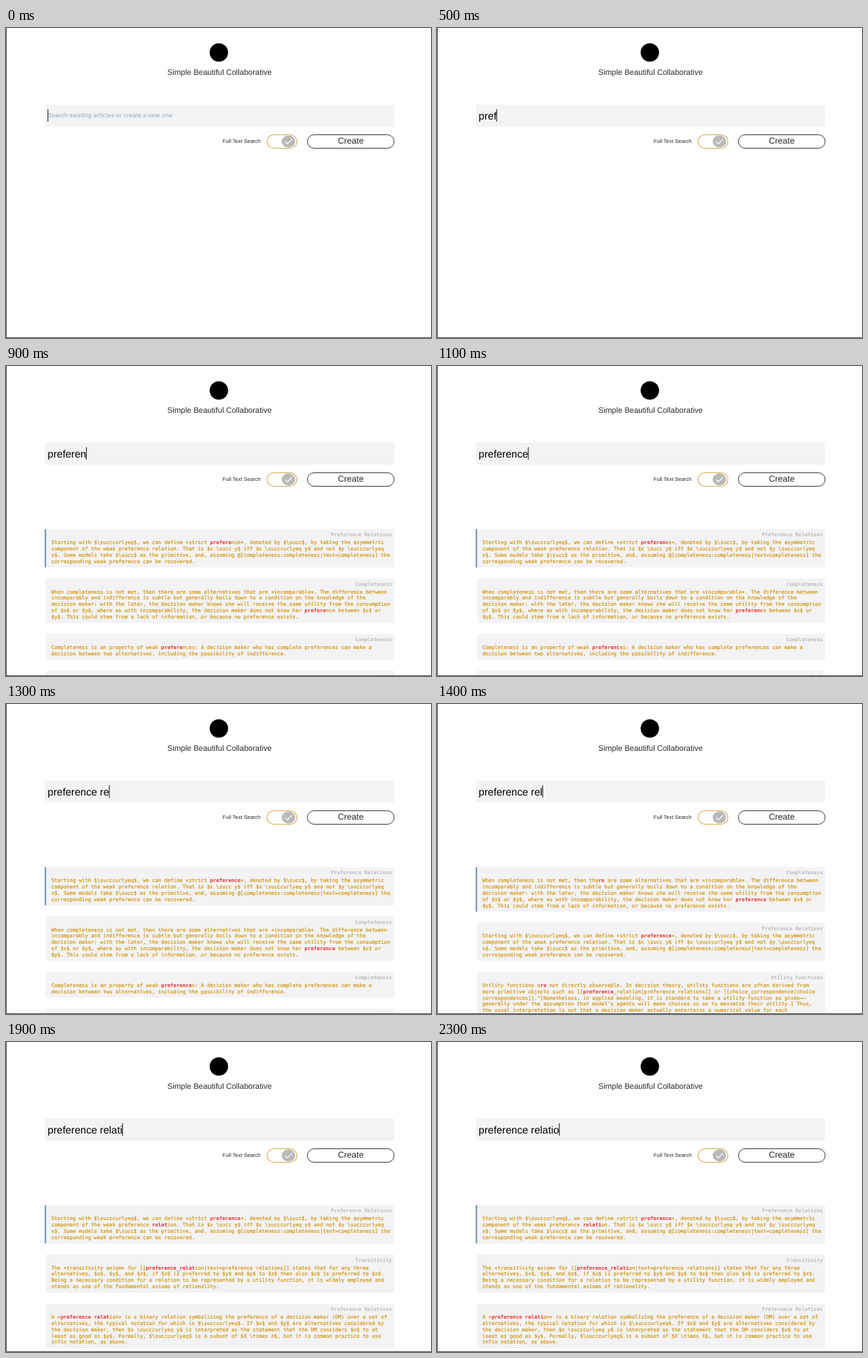
Write an HTML page that moves like this. It is 600x437 px and loops after 2.4 s.

```html
<!DOCTYPE html>
<html lang="en">
<head>
<meta charset="utf-8">
<title>Article search</title>
<style>
  html, body { margin: 0; width: 100%; height: 100%; overflow: hidden; background: #fefdff; }
  svg { display: block; width: 600px; height: 437px; }
  text { font-family: "Liberation Sans", Arial, sans-serif; fill: #2c2c2c; white-space: pre; text-rendering: geometricPrecision; }
  #typed { font-size: 14.6px; fill: #000; }
  #hint { font: 500 8.45px Inter, sans-serif; fill: #9bb6cd; }
  #cards text { font: 7.17px "DejaVu Sans Mono", monospace; fill: #d09a14; stroke: #d09a14; stroke-width: 0.22px; }
  #cards .title { font-weight: bold; fill: #bdbcbf; stroke: none; text-anchor: end; }
  #cards .hit { font-weight: bold; fill: #ee302b; stroke: none; }
</style>
</head>
<body>
<svg viewBox="0 0 600 437">
  <rect width="600" height="437" fill="#fefdff"/>
  <circle cx="300.5" cy="34.5" r="13"/>
  <text x="301.5" y="66.4" font-size="11.05" text-anchor="middle">Simple Beautiful Collaborative</text>

  <rect x="55" y="108" width="493" height="31" fill="#f3f2f4"/>
  <text id="hint" x="59" y="126.4">Search existing articles or create a new one</text>
  <text id="typed" x="58.8" y="128.5"></text>
  <rect id="caret" y="114.5" width="1" height="17.5" fill="#111"/>

  <text x="305.8" y="162.2" font-size="7.52">Full Text Search</text>
  <rect x="368.5" y="150.5" width="42.2" height="19" rx="9.5" fill="#fefdff" stroke="#d8ad4c" stroke-width="1.1"/>
  <ellipse cx="398.7" cy="160" rx="9.5" ry="8.4" fill="#b9b8ba"/>
  <path d="M394 160.2l3.2 3.2l6.8 -6.8" fill="none" stroke="#fff" stroke-width="1.2"/>
  <rect x="425.5" y="150.5" width="122.5" height="19" rx="9.5" fill="#fefdff" stroke="#3c3c3c" stroke-width="1"/>
  <text x="486.7" y="163.2" font-size="12.2" text-anchor="middle">Create</text>

  <g id="cards"></g>
  <path d="M0.5 0V436.5H600" fill="none" stroke="#555" stroke-width="1"/>
</svg>
<script>
const raw = String.raw;
const articles = {
  magnitude: ["Preference Relations", raw`The magnitude of the utilities in a representation are irrelevant (and indeed at times misleading), since $\s$
embodies only ordinal preference. Without additional assumptions on the interpretation of $\s$ (for example
expected utility), there is no sense in which $x \s y$ measures how much *more preferred* $x$ is than $y$, only
that it is preferred.`],
  strict: ["Preference Relations", raw`Starting with $\succcurlyeq$, we can define *strict preference*, denoted by $\succ$, by taking the asymmetric
component of the weak preference relation. That is $x \succ y$ iff $x \succcurlyeq y$ and not $y \succcurlyeq
x$. Some models take $\succ$ as the primitive, and, assuming @[completeness:completeness|text=completeness] the
corresponding weak preference can be recovered.`],
  transitive: ["Transitivity", raw`The *transitivity axiom* for [[preference_relation|text=preference relations]] states that for any three
alternatives, $x$, $y$, and $z$, if $x$ is preferred to $y$ and $y$ to $z$ then also $x$ is preferred to $z$.
Being a necessary condition for a relation to be represented by a utility function, it is widely employed and
stands as one of the fundamental axioms of rationality.`],
  incomparable: ["Completeness", raw`When completeness is not met, then there are some alternatives that are *incomparable*. The difference between
incomparably and indifference is subtle but generally boils down to a condition on the knowledge of the
decision maker: with the later, the decision maker knows she will receive the same utility from the consumption
of $x$ or $y$, where as with incomparability, the decision maker does not know her preference between $x$ or
$y$. This could stem from a lack of information, or because no preference exists.`],
  complete: ["Completeness", raw`Completeness is an property of weak preferences: A decision maker who has complete preferences can make a
decision between two alternatives, including the possibility of indifference.`],
  weak: ["Weak", ""],
  utility: ["Utility Functions", raw`Utility functions are not directly observable. In decision theory, utility functions are often derived from
more primitive objects such as [[preference_relation|preference relations]] or [[choice_correspondence|choice
correspondences]].^[Nonetheless, in applied modeling, it is standard to take a utility function as given——
generally under the assumption that model's agents will make choices so as to maximize their utility.] Thus,
the usual interpretation is not that a decision maker actually entertains a numerical value for each
`],
  binary: ["Preference Relations", raw`A *preference relation* is a binary relation symbolizing the preference of a decision maker (DM) over a set of
alternatives, the typical notation for which is $\succcurlyeq$. If $x$ and $y$ are alternatives considered by
the decision maker, then $x \succcurlyeq y$ is interpreted as the statement that the DM considers $x$ to at
least as good as $y$. Formally, $\succcurlyeq$ is a subset of $X \times X$, but it is common practice to use
infix notation, as above.`]
};

const phrase = "preference relation";
const STEP = 100, LOOP = 2400;
// Characters typed, and characters already searched for, at each step
const typedCount = [0, 1, 2, 3, 3, 4, 5, 6, 7, 8, 9, 10, 11, 13, 14, 15, 16, 16, 16, 17, 17, 17, 17, 18];
const searchedCount = [0, 0, 0, 0, 0, 0, 3, 4, 5, 7, 8, 9, 10, 11, 13, 14, 15, 16, 16, 16, 17, 17, 17, 17];

const LINE = 8.83, TOP = 230, GAP = 15.6;
const byId = id => document.getElementById(id);
const typed = byId("typed"), caret = byId("caret"), hint = byId("hint"), cards = byId("cards");

function add(parent, tag, attrs, content = "") {
  const node = document.createElementNS("http://www.w3.org/2000/svg", tag);
  for (const key in attrs) node.setAttribute(key, attrs[key]);
  node.textContent = content;
  return parent.appendChild(node);
}

function resultsFor(count) {
  if (count < 3) return [];
  if (count < 7) return ["magnitude", "strict", "transitive"];
  if (count < 13) return ["strict", "incomparable", "complete", "weak"];
  if (count < 14) return ["incomparable", "strict", "utility"];
  return ["strict", "transitive", "binary"];
}

// Marks the first occurrence of every term, joining hits across one underscore
function findHits(body, terms) {
  const hits = Array(body.length).fill(false);
  for (const term of terms) {
    const start = body.indexOf(term);
    if (start >= 0) hits.fill(true, start, start + term.length);
  }
  return hits.map((hit, i) => hit || (body[i] === "_" && hits[i - 1] && hits[i + 1]));
}

function drawLine(line, hits, y) {
  const text = add(cards, "text", { x: 64, y });
  for (let i = 0; i < line.length;) {
    let end = i + 1;
    while (end < line.length && hits[end] === hits[i]) end++;
    add(text, "tspan", hits[i] ? { class: "hit" } : {}, line.slice(i, end).replaceAll("*", "∗"));
    i = end;
  }
}

function drawCards(count) {
  cards.replaceChildren();
  const terms = phrase.slice(0, count).trim().split(" ");
  let y = TOP;
  resultsFor(count).forEach((key, index) => {
    const [title, body] = articles[key];
    const lines = body.split("\n"), hits = findHits(body, terms);
    const height = 18.5 + LINE * lines.length;
    add(cards, "rect", { x: 56.5, y, width: 491.5, height, fill: "#f3f2f4" });
    if (index === 0) add(cards, "rect", { x: 54.7, y, width: 1.8, height, fill: "#5f85a2" });
    add(cards, "text", { x: 544.8, y: y + 10.4, class: "title" }, title);
    let offset = 0;
    lines.forEach((line, row) => {
      drawLine(line, hits.slice(offset, offset + line.length), y + 21.2 + row * LINE);
      offset += line.length + 1;
    });
    y += height + GAP;
  });
}

let shownStep = -1, shownSearch = -1;
function render(time) {
  const step = Math.floor((time % LOOP) / STEP);
  if (step === shownStep) return;
  shownStep = step;
  const count = typedCount[step];
  typed.textContent = phrase.slice(0, count);
  hint.style.display = count ? "none" : "";
  caret.setAttribute("x", 58.6 + (count ? typed.getComputedTextLength() : 0));
  if (searchedCount[step] !== shownSearch) drawCards(shownSearch = searchedCount[step]);
}

const start = performance.now();
function tick() {
  render(performance.now() - start);
  requestAnimationFrame(tick);
}
tick();
</script>
</body>
</html>
```
